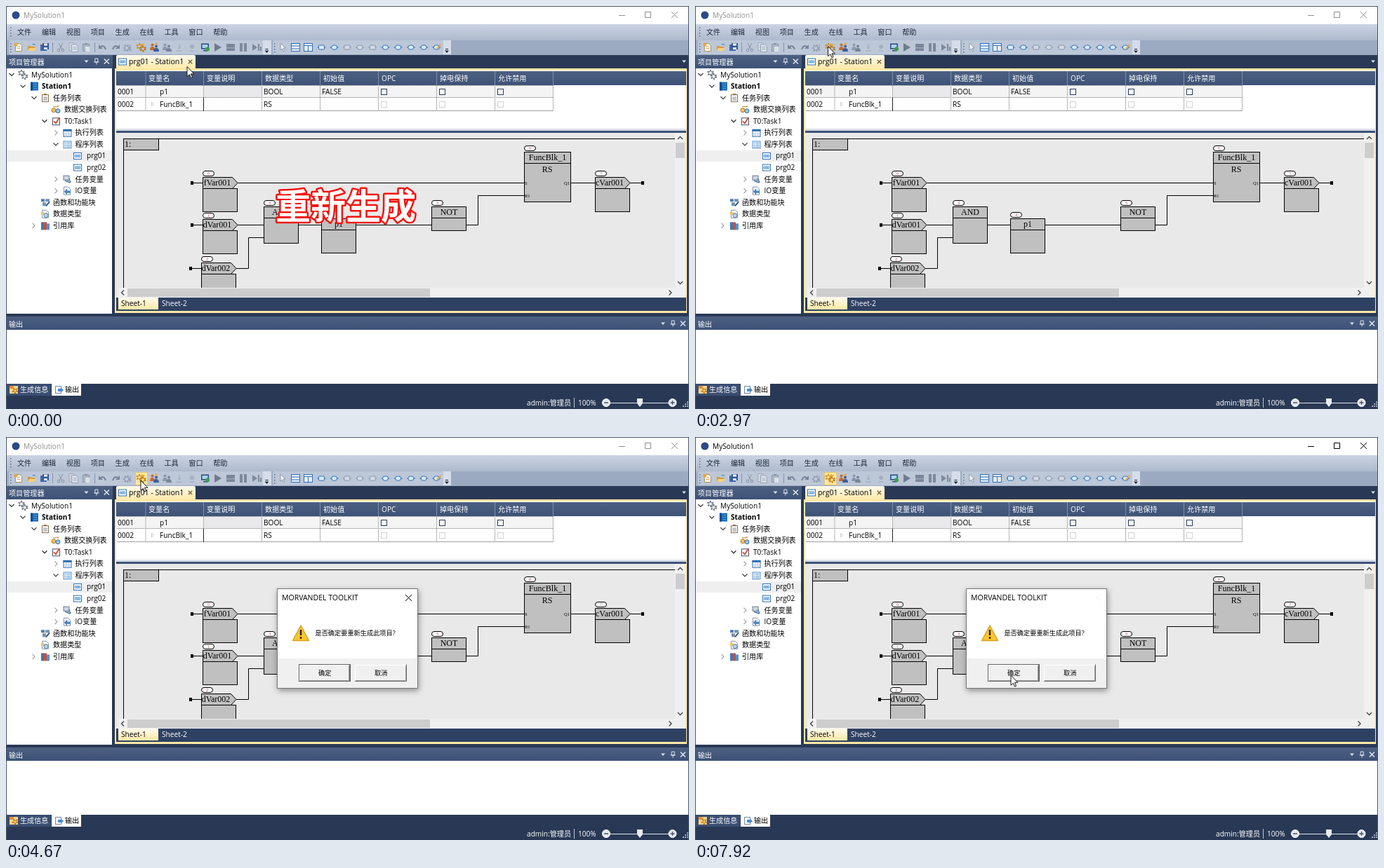
An HTML page for the animation above (7.99 s loop, 973 by 575 pixels).

```html
<!DOCTYPE html>
<html lang="zh">
<head>
<meta charset="utf-8">
<title>MySolution1</title>
<style>
html, body { margin: 0; width: 100%; height: 100%; overflow: hidden; background: #293955; }
svg { display: block; width: 973px; height: 575px; }
text { font: 10.15px "Open Sans", "Noto Sans CJK SC", "Noto Sans CJK", sans-serif; white-space: pre; }
.serif { font: 12px "Liberation Serif", serif; text-anchor: middle; }
.pin { font: 6.5px "Liberation Serif", serif; }
.small { font-size: 9.2px; }
.headline { font: 900 50px "Noto Sans CJK SC", "Noto Sans CJK", sans-serif; paint-order: stroke; stroke-linejoin: round; }
</style>
</head>
<body>
<svg id="stage" viewBox="0 0 973 575" xmlns="http://www.w3.org/2000/svg"></svg>
<script>
const LOOP = 7990;
const NAVY = '#293955', YELLOW = '#ffe8a6', INK = '#1b2738', BLUE = '#2f6fb5', GREY = '#8793a5', ORANGE = '#e9a63a';

const rect = (x, y, w, h, fill, more = '') => `<rect x="${x}" y="${y}" width="${w}" height="${h}" fill="${fill}" ${more}/>`;
const box = (x, y, w, h, fill, line, more = '') => rect(x + .5, y + .5, w - 1, h - 1, fill, `stroke="${line}" ${more}`);
const path = (d, line, width = 1, fill = 'none', more = '') => `<path d="${d}" stroke="${line}" stroke-width="${width}" fill="${fill}" ${more}/>`;
const shape = (d, fill) => `<path d="${d}" fill="${fill}"/>`;
const disc = (x, y, r, fill, line = 'none') => `<circle cx="${x}" cy="${y}" r="${r}" fill="${fill}" stroke="${line}"/>`;
const text = (x, y, s, fill = '#000', more = '') => `<text x="${x}" y="${y}" fill="${fill}" ${more}>${s}</text>`;
const group = (inner, more = '') => `<g ${more}>${inner}</g>`;
const at = (x, y, inner) => group(inner, `transform="translate(${x} ${y})"`);
const cross = (x, y, r, line, width = 1, more = '') =>
  path(`M${x - r} ${y - r}l${2 * r} ${2 * r}m0 ${-2 * r}l${-2 * r} ${2 * r}`, line, width, 'none', more);
const drop = (x, y, fill = '#dce3ee') => shape(`M${x - 3} ${y - 1.5}h6l-3 3.5z`, fill);
const grip = (x, y, n) => Array.from({ length: n }, (_, i) => rect(x, y + i * 4, 1.5, 1.5, '#5c6c86')).join('');
const gradient = (id, a, b) => `<linearGradient id="${id}" x2="0" y2="1"><stop stop-color="${a}"/><stop offset="1" stop-color="${b}"/></linearGradient>`;
const panelButtons = (x, y, gap) => drop(x, y) +
  path(`M${x + gap - 2} ${y - 4}h4v5h-4zm-1.5 5h7m-3.5 0v3.5`, '#dce3ee') + cross(x + 2 * gap, y, 3.5, '#e8edf5', 1.4);

// Icons are drawn around their centre.
const gear = (x, y, r, c) => disc(x, y, r, 'none', c) +
  `<circle cx="${x}" cy="${y}" r="${r + 1.2}" fill="none" stroke="${c}" stroke-width="2" stroke-dasharray="2 2"/>`;
const page = (c, fill = '#fff') => path('M-4.5 -5.5h6l3 3v8h-9z', c, 1, fill) + path('M-2.5 -1h5m-5 2.5h5', c, .8);
const people = (a, b) => disc(-2.5, -3.5, 2, a) + shape('M-6 4q0 -5 3.5 -5t3.5 5z', a) + disc(3, -1.5, 2, b) + shape('M-1 6q0 -5 4 -5t4 5z', b);
const table = (c = BLUE) => box(-6, -5, 12, 11, '#fff', c) + rect(-6, -5, 12, 3, c) + path('M-6 1h12M-6 3.5h12M-2 -2v8M2 -2v8', '#9db9d8', .7);
const prg = rect(-5.5, -4.5, 11, 9, '#fff', `stroke="${BLUE}"`) + rect(-4, -2, 8, 4, '#5a9bd8') + path('M-2.5 -1v2m2.5 -2v2m2.5 -2v2', '#fff', .9);

const icons = {
  create: page('#b08d4a') + disc(-4, -4, 2.5, ORANGE),
  open: shape('M-6 -2h4l1 1h5v6h-10z', '#d79a3c') + shape('M-4 1h10l-3 4h-9z', '#f7d27c') + path('M1 -4q3 -2 4 1', BLUE),
  save: rect(-6, -4, 9, 9, '#4568a8') + rect(-3, -6, 9, 9, '#345795') + rect(-1, -5.5, 5, 3, '#fff') + rect(-1, 0, 5, 3, '#dce5f3'),
  cut: path('M-3 -6l5 9M3 -6l-5 9', GREY) + disc(-3, 4, 1.8, 'none', GREY) + disc(3, 4, 1.8, 'none', GREY),
  copy: at(-1.5, -1, page('#9aa5b5', '#d5dce7')) + at(2, 1, page('#9aa5b5', '#d5dce7')),
  paste: box(-5, -5, 10, 11, '#aab4c3', '#9099a8') + rect(-2, -6, 4, 2, GREY) + rect(-1, -1, 6, 7, '#dbe1ea'),
  undo: path('M-4 0q5 -5 8 3', '#77849a', 2) + shape('M-6 -4v6h6z', '#77849a'),
  redo: path('M4 0q-5 -5 -8 3', '#77849a', 2) + shape('M6 -4v6h-6z', '#77849a'),
  compile: gear(-2, 1, 3, '#8f9bad') + path('M3 -4v9m-2 -2l2 2l2 -2', '#8f9bad'),
  rebuild: gear(-2.5, -1.5, 2.5, '#d48a17') + gear(2.5, 2, 2.5, '#b9740f') + shape('M0 -6l6 2l-4 2z', '#e8a930'),
  users: people('#c96a2b', '#3c5f97') + disc(3, -5, 1.8, ORANGE),
  usersOff: people('#8d98a8', '#76849a'),
  down: path('M0 -5v7m-2.5 -2.5l2.5 2.5l2.5 -2.5M-4 5h8', '#9aa5b6'),
  dot: disc(0, -1, 3, '#a5afbe') + path('M-3 5h6', '#9aa5b6'),
  monitor: rect(-6, -5.5, 11, 8, '#284a80') + rect(-4.5, -4, 8, 5, '#a9d3f2') + rect(-3, 4, 6, 1.5, '#284a80') + disc(3, 2.5, 3, '#3f9a51'),
  play: shape('M-5 -6l10 6l-10 6z', '#6f7b8d'),
  stop: rect(-6, -5, 12, 10, '#79869a') + rect(-6, 0, 12, 1.5, '#9ba6b6'),
  pause: rect(-5, -6, 4, 12, '#7d8a9c') + rect(1, -6, 4, 12, '#7d8a9c'),
  step: shape('M-6 -5l7 5l-7 5z', '#7d8a9c') + rect(2, -5, 2, 10, '#7d8a9c') + rect(5, -1, 2, 6, '#7d8a9c'),
  pointer: path('M-3 -6v10l2.5 -2l2 4l1.5 -1l-2 -4h3z', '#8d98a9', 1, '#f6f8fb'),
  rows: box(-6, -6, 13, 12, '#e8f1fb', BLUE) + path('M-6 -2h13M-6 2h13', BLUE),
  columns: box(-6, -6, 13, 12, '#e8f1fb', BLUE) + path('M-6 -2.5h13M0.5 -2v8', BLUE),
  solution: gear(-2, -2.5, 2.5, '#6d7680') + gear(2.5, 2.5, 2.5, '#6d7680'),
  station: rect(-5.5, -6, 11, 12, '#1d6fb8') + rect(-5.5, -6, 3, 12, '#0c4d88') + path('M-1 -3h5m-5 3h5m-5 3h5', '#5ea6e0', .8),
  tasks: box(-5, -5, 10, 11, '#fff', '#8a6b4a') + rect(-2, -6, 4, 2, '#8a6b4a') + path('M-3 -1h6m-6 2h6m-6 2h6', '#777', .8),
  swap: disc(-3, 1, 3, '#f3c15c', '#b77a1f') + disc(3, 2, 3, '#9cc4e8', '#3c6ea7') + path('M-4 -4h8l-2 -2', '#c9852a'),
  task: box(-5, -5, 11, 11, '#fff', '#44546e') + path('M-3 0l3 3l5 -8', '#d2492a', 1.8),
  table: table(),
  list: box(-6, -5, 12, 11, '#eaf3fc', '#5a96cf') + path('M-4 -2h2m1 0h5M-4 1h2m1 0h5M-4 3.5h2m1 0h5', '#5a96cf'),
  prg,
  variable: rect(-5, -5, 8, 6, '#cfd8e4', 'stroke="#6c7c92"') + path('M-3 2l7 3M3 -1l2 6', '#46688f', 1.3) + disc(2, 2, 2, '#7ea4cf'),
  io: page('#7d8fa8') + shape('M-4 1l4 -4v3h5v3h-5v3z', '#487fb9'),
  blocks: rect(-6, -5, 5, 4, '#4480bd') + rect(0, -5, 6, 4, '#7892b0') + rect(-4, 0, 5, 5, '#7892b0') + path('M1 5l5 -6', '#31577f', 2),
  types: page('#8596ab') + disc(1, 2, 3, '#b7d2ec', '#5c86b2') + rect(-6, -3, 4, 4, '#f0c362'),
  library: rect(-6, -5, 4, 11, '#3f77b5') + rect(-2, -5, 4, 11, '#c94f3b') + rect(2, -3, 4, 9, '#4d94d6'),
  build: rect(-6, -5, 12, 11, '#f5d58a') + gear(2, 2, 2, '#c17a17') + rect(-6, -5, 6, 4, '#e2913a'),
  output: box(-5, -5, 9, 11, '#fff', '#6f87a8') + shape('M-1 -1h4v-2l4 4l-4 4v-2h-4z', '#4a8bcb')
};
const icon = (name, x, y = 59) => at(x, y, icons[name]);

function chrome() {
  const controls = path('M873 13.5h9', 'currentColor') + path('M910.5 8.5h8v8h-8z', 'currentColor') + cross(952.5, 12.5, 4.5, 'currentColor');
  const menus = ['文件', '编辑', '视图', '项目', '生成', '在线', '工具', '窗口', '帮助'];
  const tools = ['create', 18, 'open', 37, 'save', 55, 'cut', 78, 'copy', 96, 'paste', 114, 'undo', 138, 'redo', 156,
    'compile', 174, 'rebuild', 192.5, 'users', 211, 'usersOff', 229, 'down', 247, 'dot', 265, 'monitor', 284, 'play', 302,
    'stop', 320, 'pause', 338, 'step', 357, 'pointer', 394, 'rows', 412, 'columns', 430];
  let s = rect(0, 0, 973, 26, '#fff') + disc(14, 13, 5.5, '#2b4a86') +
    group(text(25, 17, 'MySolution1', 'currentColor') + controls, 'id="caption"') +
    rect(0, 26, 973, 23, 'url(#menu)') + grip(6, 30, 4) +
    menus.map((m, i) => text(16 + i * 34.9, 41, m, INK)).join('') +
    rect(0, 49, 973, 21, '#9caac1') + rect(4, 49, 374, 20, '#bcc7d8', 'rx="2"') + rect(380, 49, 254, 20, '#bcc7d8', 'rx="2"') +
    rect(366, 49, 12, 20, '#d5ddea') + rect(623, 49, 11, 20, '#d5ddea') +
    grip(6, 53, 4) + grip(382, 53, 4) +
    path('M66.5 52v14M126.5 52v14M386.5 52v0', '#8592a8') +
    box(184, 50, 18, 19, '#ffe7a0', '#e5c365', 'id="hot"');
  for (let i = 0; i < tools.length; i += 2) s += icon(tools[i], tools[i + 1]);
  for (let i = 0; i < 10; i++) {
    const x = 449.5 + i * 18.2, off = i > 1 && i < 5 && i !== 5, c = off ? '#8995a6' : BLUE;
    s += path(`M${x - 6} 59h12`, c) + rect(x - 4, 56, 8, 6, off ? '#d3dae5' : '#d9ecff', `stroke="${c}" rx="${i % 2 || i > 5 ? 3 : 1}"`);
  }
  s += path('M614 61l5 -6', ORANGE, 2);
  for (const x of [371.5, 628]) s += rect(x - 2, 61, 4, 1, INK) + drop(x, 65, INK);
  return s;
}

function projectTree() {
  // label, text x, icon, icon x, arrow x, arrow state
  const rows = [
    ['MySolution1', 36, 'solution', 24, 8, 1], ['Station1', 51, 'station', 40.5, 24, 1], ['任务列表', 67, 'tasks', 56, 40, 1],
    ['数据交换列表', 83, 'swap', 71], ['T0:Task1', 83, 'task', 71, 55, 1], ['执行列表', 98.5, 'table', 87.5, 71, 0],
    ['程序列表', 98.5, 'list', 87.5, 71, 1], ['prg01', 115, 'prg', 102], ['prg02', 115, 'prg', 102],
    ['任务变量', 98.5, 'variable', 87, 71, 0], ['IO变量', 98.5, 'io', 87, 71, 0], ['函数和功能块', 67, 'blocks', 56],
    ['数据类型', 67, 'types', 56], ['引用库', 67, 'library', 56, 39, 0]];
  return rect(0, 70, 152, 19, 'url(#panel)') + text(4, 83.5, '项目管理器', '#fff') + panelButtons(114.5, 79, 14.4) +
    rect(1, 89, 150, 350, '#fff') + rect(1, 206, 150, 16, '#efefef') +
    rows.map(([label, tx, name, ix, ax, open], i) => {
      const y = 98 + i * 16.57;
      const arrow = ax === undefined ? '' : open
        ? path(`M${ax - 3.5} ${y - 2}l3.5 3.5l3.5 -3.5`, '#333', 1.2)
        : path(`M${ax - 1.5} ${y - 3.5}l3.5 3.5l-3.5 3.5`, '#999', 1.1);
      return arrow + icon(name, ix, y) + text(tx, y + 3.5, label, '#000', i === 1 ? 'font-weight="700" style="font-weight:700"' : '');
    }).join('');
}

function variableGrid() {
  const heads = [[203, '变量名'], [286, '变量说明'], [369, '数据类型'], [452, '初始值'], [535, 'OPC'], [618, '掉电保持'], [701, '允许禁用']];
  const edges = [199, 281.5, 364.5, 447.5, 530.5, 613.5, 696.5, 779.5];
  let s = rect(157, 70, 113, 20, 'url(#tab)', 'rx="2"') + icon('prg', 166, 79.5) +
    text(175, 83, 'prg01 - Station1', '#000', 'style="font-size:10.6px"') + cross(262.5, 79.5, 2.7, '#75633d', 1.3) + drop(966, 79) +
    rect(155, 89, 815, 349, YELLOW) + rect(157, 92, 812, 83, '#fff') + rect(157, 93, 812, 20, 'url(#panel)') +
    heads.map(h => text(h[0], 106.5, h[1], '#fff')).join('') +
    edges.map(x => path(`M${x} 93v20`, '#8090ab')).join('') +
    rect(158, 113, 622, 18, '#f4f4f4') + rect(282, 114, 82, 16, '#e9e9ec') +
    path('M158 113.5h622M158 130.5h622', '#777', 1, 'none', 'stroke-dasharray="1 1"') + path('M158 149.5h622', '#a0a0a0') +
    edges.map(x => path(`M${x} 113v37`, '#b5b5b5')).join('') + path('M281.5 131v19', '#222');
  [['0001', 'p1', 'BOOL', 'FALSE'], ['0002', 'FuncBlk_1', 'RS', '']].forEach((row, i) => {
    const y = 125.5 + i * 18.3;
    s += [159, 219, 367, 450].map((x, k) => text(x, y, row[k])).join('') +
      [534, 617, 700].map(x => box(x, 118 + i * 18, 9, 9, '#fff', i ? '#d2d2d2' : '#26395c')).join('');
  });
  return s + path('M207.5 137l3 3l-3 3z', '#ccc') + rect(157, 175, 812, 3, '#d9dee7') + rect(157, 178, 812, 3, '#3d5277');
}

const tagId = (x, y, n) => rect(x + .5, y + .5, 16, 7, '#fff', 'stroke="#000" rx="3.5"') +
  text(x + 8.5, y + 6.3, n, '#a55', 'class="pin" text-anchor="middle"');
const variable = (x, y, n, name) => box(x, y + 8, 50, 34, '#c0c0c0', '#000') +
  path(`M${x + .5} ${y - 7.5}h42l7.5 8l-7.5 8h-42z`, '#000', 1, '#c0c0c0') + tagId(x, y - 17, n) +
  text(x + 21, y + 4, name, '#000', 'class="serif"');
const block = (x, y, w, h, n, name) => box(x, y, w, h, '#c0c0c0', '#000') + path(`M${x} ${y + 16.5}h${w}`, '#000') +
  tagId(x, y - 9, n) + text(x + w / 2, y + 12, name, '#000', 'class="serif"');
const input = (x, y, n, name) => path(`M${x - 14} ${y + .5}h14`, '#000') + rect(x - 17, y - 2, 4, 5, '#000') + variable(x, y, n, name);

function diagram() {
  const wires = 'M330 252.5H738M804 252.5H839M889 252.5H906M330 312.5H367M416 312.5H449M498 312.5H606' +
    'M655 312.5H672.5V270.5H738M328 374.5H345.5V330.5H367';
  const nodes = path('M953 189.5H167.5V402', '#000') + box(167, 189, 51, 17, '#c0c0c0', '#000') +
    text(169, 201, '1:', '#000', 'class="serif" style="text-anchor:start"') + path(wires, '#000') +
    input(280, 252, 0, 'fVar001') + input(280, 312, 1, 'dVar001') + input(278, 374, 2, 'dVar002') +
    block(367, 286, 50, 53, 3, 'AND') + block(449, 303, 50, 50, 4, 'p1') + block(606, 286, 50, 35, 5, 'NOT') +
    block(738, 208, 67, 72, 6, 'FuncBlk_1') + text(771, 237, 'RS', '#000', 'class="serif"') +
    text(739, 255, 'S', '#000', 'class="pin"') + text(739, 273, 'R1', '#000', 'class="pin"') + text(795, 255, 'Q1', '#000', 'class="pin"') +
    variable(839, 252, 7, 'cVar001') + rect(905, 250, 4, 5, '#000');
  return rect(157, 181, 811, 235, '#e9e9e9') + `<clipPath id="view"><path d="M157 181h796v221h-796z"/></clipPath>` +
    group(nodes, 'clip-path="url(#view)"') +
    rect(953, 181, 15, 235, '#f0f0f0') + rect(160, 402, 808, 14, '#f0f0f0') +
    rect(954, 195, 13, 22, '#cdcdcd') + rect(173, 403, 431, 12, '#cdcdcd') +
    path('M957 190l3.5 -3.5l3.5 3.5M957 393l3.5 3.5l3.5 -3.5M168 405.5l-3.5 3.5l3.5 3.5M944.5 405.5l3.5 3.5l-3.5 3.5', '#444', 1.4) +
    rect(157, 416, 812, 19, '#2f4163') + rect(160, 416, 57, 17, 'url(#tab)') +
    text(164, 428, 'Sheet-1') + text(222, 428, 'Sheet-2', '#fff');
}

function outputPanel() {
  return rect(0, 443, 973, 19, 'url(#panel)') + text(4, 457.5, '输出', '#fff') + panelButtons(936, 453, 14.2) +
    rect(1, 462, 971, 77, '#fff') + rect(0, 539, 973, 36, NAVY) + rect(0, 539, 64, 17, '#3a4e72') + icon('build', 11, 547) +
    text(20, 550.5, '生成信息', '#fff') + rect(65, 538, 42, 18, '#fff') + icon('output', 75, 547) + text(84, 550.5, '输出') +
    text(742, 570, 'admin:管理员', '#fff') + path('M809.5 559v14', '#b9c4d6') + text(815, 570, '100%', '#fff') +
    path('M861 566.5h83', '#dfe5ee') + disc(855, 566, 5.5, '#e4e8ef', '#fff') + disc(949.5, 566, 5.5, '#e4e8ef', '#fff') +
    path('M852 566h6M946.5 566h6m-3 -3v6', '#44546f', 1.3) + shape('M899 560h8v7l-4 5l-4 -5z', '#e9edf3') +
    [0, 1, 2].map(i => Array.from({ length: i + 1 }, (_, k) => rect(970 - k * 3, 564 + i * 3, 2, 2, '#9fabc0')).join('')).join('');
}

const raised = (x, w) => rect(x, 325, w, 24, '#f0f0f0') + path(`M${x + .5} 348.5v-23h${w - 1}`, '#fff') +
  path(`M${x} 348.5h${w - .5}v-24`, '#696969') + path(`M${x + 1} 347.5h${w - 2.5}v-21`, '#a0a0a0');

function dialog() {
  return rect(386, 216, 201, 143, '#fff', 'filter="url(#shadow)"') + box(386, 216, 201, 143, '#fff', '#777') +
    rect(387, 316, 199, 42, '#f0f0f0') + text(393, 233, 'MORVANDEL TOOLKIT', '#000', 'style="font-size:10.5px"') +
    cross(573.5, 229.5, 4.5, 'currentColor', 1, 'id="close"') +
    path('M420 269l11.5 21.5h-23z', '#d7a21d', 1.5, '#fcc62f', 'stroke-linejoin="round"') +
    path('M420 275v8', '#222', 2.4) + disc(420, 286.5, 1.4, '#222') +
    text(440.5, 282.5, '是否确定要重新生成此项目?', '#000', 'class="small"') +
    raised(418, 72) + box(417, 324, 74, 25, 'none', '#646464') + text(445, 340, '确定', '#000', 'class="small" id="ok"') +
    group(box(418, 325, 72, 23, 'none', '#a0a0a0'), 'id="pressed"') +
    raised(497, 74) + text(525, 340, '取消', '#000', 'class="small"');
}

const stage = document.getElementById('stage');
stage.innerHTML = '<defs>' + gradient('menu', '#cad3e2', '#aebacd') + gradient('panel', '#4d6082', '#3d5277') + gradient('tab', '#fffbee', '#ffe8a6') +
  '<filter id="shadow" x="-20%" y="-20%" width="140%" height="150%"><feDropShadow dx="1" dy="3" stdDeviation="4" flood-opacity=".4"/></filter></defs>' +
  rect(0, 0, 973, 575, NAVY) + chrome() + projectTree() + variableGrid() + diagram() + outputPanel() +
  path('M0 .5h973M.5 0v575M972.5 0v575', '#4a5568', 1) + group(dialog(), 'id="dialog"') +
  text(384, 304, '重新生成', '#fff', 'class="headline" id="headline" stroke="#f5140f" stroke-width="5"') +
  group(path('M0 0v14.2l3.3 -3l2.2 5l2.1 -1l-2.2 -4.8h4.5z', '#000', .9, '#fff'), 'id="cursor"');

const part = Object.fromEntries(['caption', 'hot', 'dialog', 'close', 'ok', 'pressed', 'headline', 'cursor'].map(id => [id, document.getElementById(id)]));
const show = (el, on) => el.setAttribute('visibility', on ? 'inherit' : 'hidden');
const last = (steps, t) => steps.filter(s => s[0] <= t).pop();

// A stepped glide: count positions from t0 to t1, ending exactly on the goal.
const glide = (t0, t1, count, [x0, y0], [x1, y1], ease) => Array.from({ length: count }, (_, i) => {
  const k = ease((i + 1) / count);
  return [t0 + (t1 - t0) * i / (count - 1), x0 + (x1 - x0) * k, y0 + (y1 - y0) * k];
});
const easeOut = u => 1 - (1 - u) ** 1.5;
const easeInOut = u => u * u * (3 - 2 * u);
const pointer = [
  [0, 258, 86.5], [500, 254, 85], [580, 247, 82],
  ...glide(730, 1270, 8, [247, 82], [194, 57.5], easeOut),
  [2970, 189.5, 57.5], [3050, 189, 58], [3130, 189, 59], [3280, 191, 61], [3360, 192, 62],
  ...glide(5660, 6280, 9, [192, 62], [450, 340], easeInOut)];
const popup = [[0, 0, 1], [4360, .12, .94], [4430, .42, .972], [4510, .78, .99], [4590, .95, .997], [4670, 1, 1]];

function draw(t) {
  const [, x, y] = last(pointer, t);
  const [, alpha, scale] = last(popup, t);
  const active = t >= 7920, down = t >= 7750 && !active;
  part.cursor.setAttribute('transform', `translate(${x} ${y})`);
  part.dialog.setAttribute('opacity', alpha);
  part.dialog.setAttribute('transform', `translate(486 287.5) scale(${scale}) translate(-486 -287.5)`);
  part.caption.setAttribute('color', active ? '#000' : '#8f8f8f');
  part.close.setAttribute('color', active ? '#f3f3f3' : '#000');
  part.ok.setAttribute('transform', down ? 'translate(1 1)' : '');
  show(part.pressed, down);
  show(part.hot, t >= 4200);
  show(part.headline, t < 500);
}

const start = performance.now();
function tick() {
  draw((performance.now() - start) % LOOP);
  requestAnimationFrame(tick);
}
draw(0);
requestAnimationFrame(tick);
</script>
</body>
</html>
```
